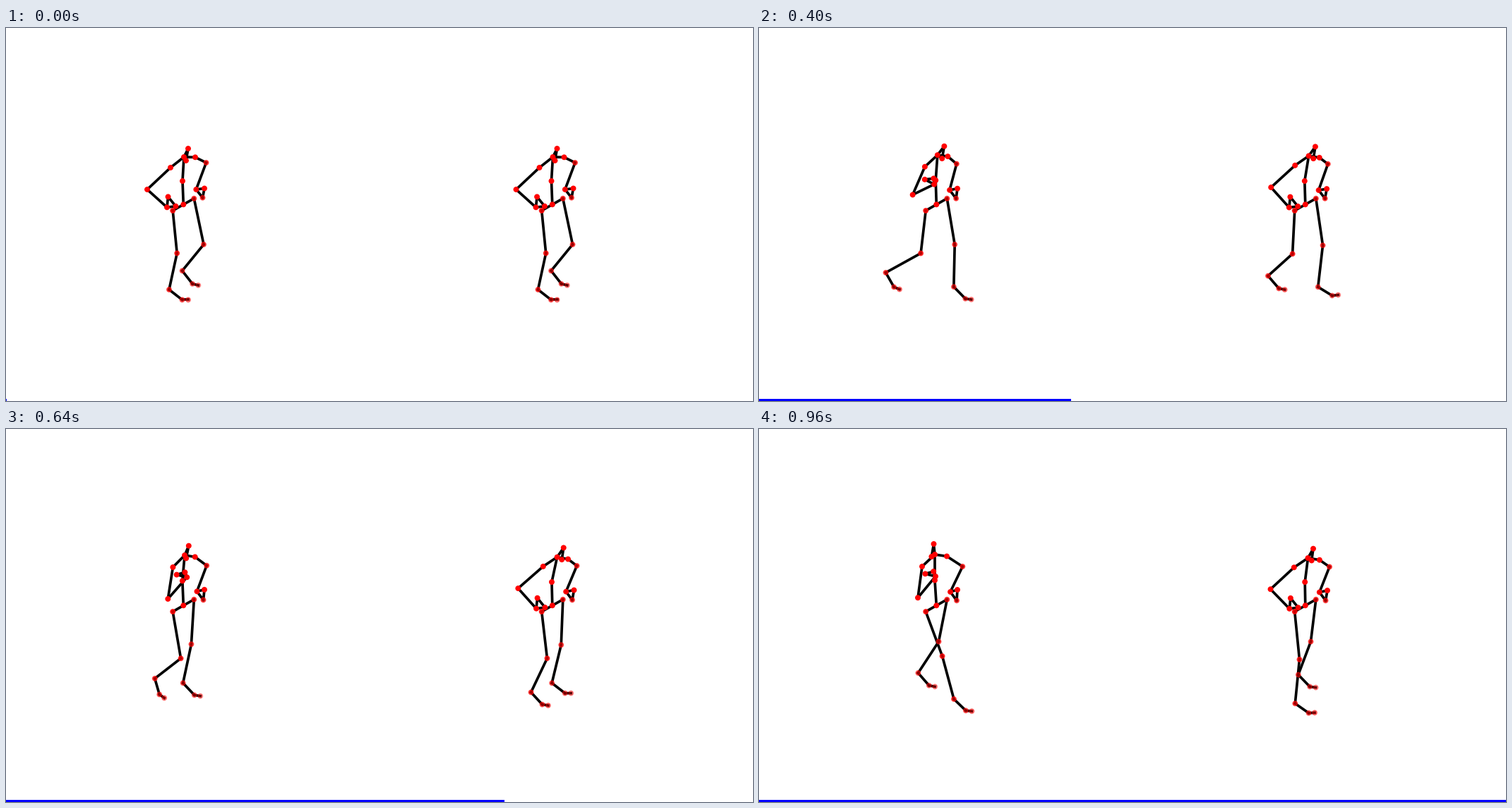
Animation, 1058 px wide and 529 px high, one loop 1 s. Source, as a matplotlib script:

```python
import numpy as np
import matplotlib.pyplot as plt
from matplotlib.animation import FuncAnimation
from matplotlib.collections import LineCollection
from matplotlib.patches import Rectangle

W, H, DPI = 1058, 529, 100
FRAMES, STEP = 25, 40
PX = 72 / DPI   # points per pixel
SHIFT = 522.5   # distance between the two walkers
FOOT, TOE, TOE_BEND = 23.5, 8.5, 38

T = np.linspace(0, 1, FRAMES)

LEG = ["hip", "knee", "ankle", "foot", "toe"]
ARM = ["shoulder", "elbow", "wrist", "tip", "thumb", "wrist"]


def side(names, s):
    return [f"{name}_{s}" for name in names]


BONES = [["pelvis", "spine", "neck", "nose", "head", "neck"]]
for s in "lr":
    BONES += [["pelvis"] + side(LEG, s), ["neck"] + side(ARM, s)]

# Joints further from the viewer are fainter.
ALPHA = {"elbow_r": 0.68, "thumb_r": 0.64, "wrist_r": 0.93}
ALPHA.update(zip(side(LEG, "l"), np.linspace(0.82, 0.47, 5)))
ALPHA.update(zip(side(LEG, "r"), np.linspace(0.70, 0.40, 5)))

# Opening pose, shared by both walkers, as x + y*1j in pixels.
REST = {
    "pelvis": 251.3 + 250.3j, "spine": 250 + 217j, "neck": 252 + 183j,
    "nose": 255 + 188j, "head": 258 + 171j,
    "hip_l": 236.2 + 259j, "knee_l": 242.2 + 319.4j, "ankle_l": 231 + 371j,
    "hip_r": 266.3 + 241.8j, "knee_r": 280 + 307j, "ankle_r": 249.6 + 344.3j,
    "shoulder_l": 233 + 198j, "elbow_l": 200 + 229j, "wrist_l": 228 + 254.3j,
    "shoulder_r": 268 + 183.3j, "elbow_r": 283.5 + 191j,
    "wrist_r": 269.3 + 229j, "tip_r": 281 + 227.5j, "thumb_r": 278.5 + 240.7j,
}

# Motion of each joint: drift, swell, swing, flick (see wave).
REACHING = {
    "spine": (-1 - 2.5j, 0.7),
    "neck": (-3 - 5j, 2.8 - 0.8j, -1.1),
    "nose": (-10.6 - 7j, 9.4, -0.2),
    "head": (-10.5 - 8j, 9.7, -0.6),
    "knee_l": (17.4 + 2.7j, -17.5 + 1j, -8 - 3.9j),
    "ankle_l": (45 + 12j, -74.5 - 32.5j, -3.3 + 1.9j, 3.7 + 1.2j),
    "knee_r": (-25.5 - 5.5j, 5.5 + 2.5j, 5.4),
    "ankle_r": (-24.2 + 1.7j, 22.4 + 17.8j, 19.4 + 6.3j, 23 + 9.2j),
    "shoulder_l": (-2 - 3j, 4, -2),
    "elbow_l": (25 + 10.3j, 12.5 + 5.8j, -7 - 3.1j, -3.7 - 2.6j),
    "wrist_l": (22 - 45.3j, 14 - 18.6j, -4 + 4.5j, -0.5 + 5.3j),
    "shoulder_r": (-2 - 2.8j, 0.6, -0.7),
    "elbow_r": (4.8 + 4j, -5.2, -1.6),
    "wrist_r": (1.7 + 2j,),
    "tip_r": (0.5j,),
    "thumb_r": (1.5 + 2.6j,),
}
RESTING = {
    "spine": (0.7,),
    "neck": (3, 3.8 - 1.7j, -1.4),
    "nose": (5.2 - 1.5j, 6.7 - 2.4j, -1.4),
    "head": (4.5 - 1.3j, 6.7 - 2.3j, -1.4),
    "knee_l": (0.8 + 7.5j, -6.9 - 0.5j, -6.5 - 2.7j, 1 - 1.5j),
    "ankle_l": (5.8 + 18.3j, -32.4 - 25.6j, -10.4 - 8j, 2 + 3.3j),
    "knee_r": (-21 - 5.5j, 2.2 + 3.8j, 5.1, 0.7),
    "ankle_r": (-8.3 + 4.2j, 11.7 + 15.6j, 16.4 + 7.8j, 16 + 11j),
    "shoulder_l": (2.3 - 1.7j, 3.6 - 2.6j, -1.2),
    "elbow_l": (2 - 1.8j, 2 - 2.4j),
    "wrist_l": (0.8 + 0.5j,),
    "shoulder_r": (3.4 + 2.4j, 2.7 - 0.5j, -1.4),
    "elbow_r": (2 + 4.5j, -0.3, -1.6),
    "wrist_r": (2 + 2.5j,),
    "tip_r": (1.5 + 1.5j,),
    "thumb_r": (1.5 + 2.6j,),
}


def wave(drift=0, swell=0, swing=0, flick=0):
    """Steady drift plus one slow and one double-speed oscillation."""
    return (drift * T + swell * np.sin(np.pi * T) ** 2
            + swing * np.sin(2 * np.pi * T) + flick * np.sin(2 * np.pi * T) ** 2)


def polar(length, degrees):
    return length * np.exp(1j * np.radians(degrees))


def ease(a, b):
    x = np.clip((T - a) / (b - a), 0, 1)
    return x * x * (3 - 2 * x)


def walker(moves, pitch, curl, dx=0):
    """Paths of all joints; pitch swings the feet, curl turns the left hand."""
    at = {name: p + dx + wave(*moves.get(name, ())) for name, p in REST.items()}
    for s, (start, *swing) in pitch.items():
        angle = start + wave(*swing)
        at["foot_" + s] = at["ankle_" + s] + polar(FOOT, angle)
        at["toe_" + s] = at["foot_" + s] + polar(TOE, angle - TOE_BEND)
    turn = curl * ease(0.17, 0.5)
    at["tip_l"] = at["wrist_l"] + polar(12.5 - 5 * turn, -7 - 105 * turn)
    at["thumb_l"] = at["wrist_l"] + polar(15, -84 - 82 * turn)
    return {name: np.column_stack([p.real, p.imag]) for name, p in at.items()}


class Figure:
    def __init__(self, ax, joints):
        self.joints = joints
        self.order = sorted(joints, key=lambda name: ALPHA.get(name, 1))
        colors = [(1, 0, 0, ALPHA.get(name, 1)) for name in self.order]
        self.bones = LineCollection([], colors="black", linewidths=3.7 * PX,
                                    capstyle="projecting")
        ax.add_collection(self.bones)
        start = np.zeros(len(colors))
        self.dots = ax.scatter(start, start, s=(6.4 * PX) ** 2, c=colors,
                               edgecolors=colors, linewidths=1.5 * PX, zorder=3)

    def pose(self, i):
        at = {name: path[i] for name, path in self.joints.items()}
        self.bones.set_segments([(at[a], at[b]) for chain in BONES
                                 for a, b in zip(chain, chain[1:])])
        self.dots.set_offsets([at[name] for name in self.order])
        return self.bones, self.dots


fig = plt.figure(figsize=(W / DPI, H / DPI), dpi=DPI, facecolor="white")
ax = fig.add_axes([0, 0, 1, 1])
ax.set(xlim=(0, W), ylim=(H, 0))
ax.axis("off")

figures = [
    Figure(ax, walker(REACHING, {"l": (38, 6, 32, -16, -8),
                                 "r": (52, -3, 0, -5, -10)}, 1)),
    Figure(ax, walker(RESTING, {"l": (38, -3, 14, -1),
                                "r": (52, -6, -11, -9, -13)}, 0, SHIFT)),
]
bar = ax.add_patch(Rectangle((0, H - 3), 0, 3, color="blue", lw=0))


def draw(i):
    bar.set_width(W * T[i] + 1)
    return [bar] + [artist for f in figures for artist in f.pose(i)]


anim = FuncAnimation(fig, draw, frames=FRAMES, interval=STEP, repeat=True,
                     repeat_delay=0, blit=False)
plt.show()
```
